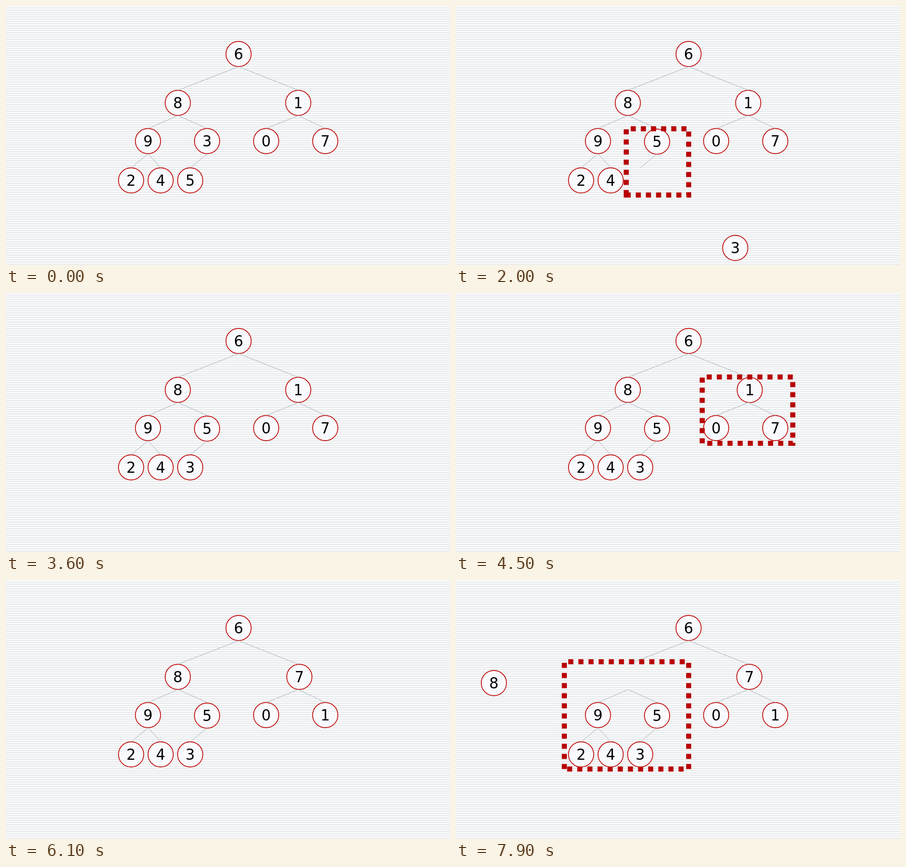
An HTML page with a canvas for the animation above (8 s loop, 789 px wide and 461 px high).

```html
<!DOCTYPE html>
<html lang="en">
<head>
<meta charset="utf-8">
<title>Building a heap</title>
<style>
  html, body { margin: 0; width: 100%; height: 100%; overflow: hidden; }
  canvas { display: block; }
</style>
</head>
<body>
<canvas id="stage" width="789" height="461"></canvas>
<script>
const ctx = document.getElementById('stage').getContext('2d');
const LOOP = 8000, STEP = 100, GLIDE = 2000, RADIUS = 22.4;

// Slots are numbered from 1, so the parent of slot i is floor(i / 2).
const levels = [
  { x: 413, y: 85, gap: 0 },
  { x: 305, y: 172, gap: 214 },
  { x: 252, y: 240, gap: 105 },
  { x: 222, y: 310, gap: 52.5 }
];
const slots = [null];
for (let i = 1; i <= 10; i++) {
  const depth = Math.floor(Math.log2(i));
  const { x, y, gap } = levels[depth];
  slots.push([x + (i - 2 ** depth) * gap, y]);
}

const nodes = [...'6819307245'].map((digit, i) => ({ digit, home: slots[i + 1], glides: [] }));

// The parent steps aside, the child rises to the top place, the parent drops into the child's slot.
// A glide that is cut short snaps to its goal when the next one begins.
function swap(parent, child, aside, top, [out, rise, drop, done]) {
  const big = nodes[child - 1], small = nodes[parent - 1];
  small.glides.push({ start: out, end: rise, to: aside });
  big.glides.push({ start: rise, end: drop, to: top });
  small.glides.push({ start: drop, end: done, to: slots[child] });
}
swap(5, 10, [497, 431], [357, 241], [707, 1300, 1890, 2600]);
swap(3, 7, [740, 196], [521, 172], [4345, 5200, 5690, 6100]);
swap(2, 4, [67, 183], slots[2], [7110, 7900, LOOP, LOOP]);

const boxes = [
  { from: 600, until: 2600, rect: [302.5, 218.5, 413.5, 336.5] },
  { from: 3200, until: 3600, rect: [192.5, 216.5, 303.5, 334.5] },
  { from: 4100, until: 6100, rect: [437.5, 149.5, 598.5, 267.5] },
  { from: 6700, until: LOOP, rect: [192.5, 145.5, 413.5, 336.5] }
];

function drawPaper() {
  ctx.fillStyle = '#f8fafb';
  ctx.fillRect(0, 0, 789, 461);
  ctx.fillStyle = '#dcdedf';
  for (let y = 3; y < 461; y += 4) ctx.fillRect(0, y, 789, 1);
}

function placeOf({ home, glides }, t) {
  let [x, y] = home;
  for (const { start, end, to } of glides) {
    if (t < start) break;
    const p = t >= end ? 1 : 2 * ((t - start) / GLIDE) ** 2;
    x += (to[0] - x) * p;
    y += (to[1] - y) * p;
  }
  return [x, y];
}

function drawNode(digit, [x, y]) {
  ctx.beginPath();
  ctx.arc(x + 0.3, y + 0.4, RADIUS, 0, 2 * Math.PI);
  ctx.fillStyle = '#f9fafd';
  ctx.fill();
  ctx.strokeStyle = '#c00000';
  ctx.lineWidth = 1.4;
  ctx.stroke();
  ctx.fillStyle = '#000';
  ctx.fillText(digit, x + 0.3, y + 10);
}

function drawEdges() {
  ctx.strokeStyle = '#b2b7be';
  ctx.lineWidth = 1;
  ctx.beginPath();
  for (let i = 2; i < slots.length; i++) {
    const [px, py] = slots[i >> 1], [x, y] = slots[i];
    ctx.moveTo(px + 0.5, py + 23);
    ctx.lineTo(x + 0.5, y - 22);
  }
  ctx.stroke();
}

// The dashes run clockwise from the lower left corner.
function drawBox([left, top, right, bottom]) {
  ctx.strokeStyle = '#b80000';
  ctx.lineWidth = 9;
  ctx.setLineDash([9]);
  ctx.beginPath();
  ctx.moveTo(left, bottom);
  ctx.lineTo(left, top);
  ctx.lineTo(right, top);
  ctx.lineTo(right, bottom);
  ctx.closePath();
  ctx.stroke();
  ctx.setLineDash([]);
}

function draw(t) {
  drawPaper();
  ctx.font = '26px "DejaVu Sans", sans-serif';
  ctx.textAlign = 'center';
  for (const node of nodes) drawNode(node.digit, placeOf(node, t));
  drawEdges();
  for (const { from, until, rect } of boxes) {
    if (t >= from && t < until) drawBox(rect);
  }
}

const begin = performance.now();
function tick() {
  const t = (performance.now() - begin) % LOOP;
  draw(Math.floor(t / STEP) * STEP);
  requestAnimationFrame(tick);
}
tick();
</script>
</body>
</html>
```
